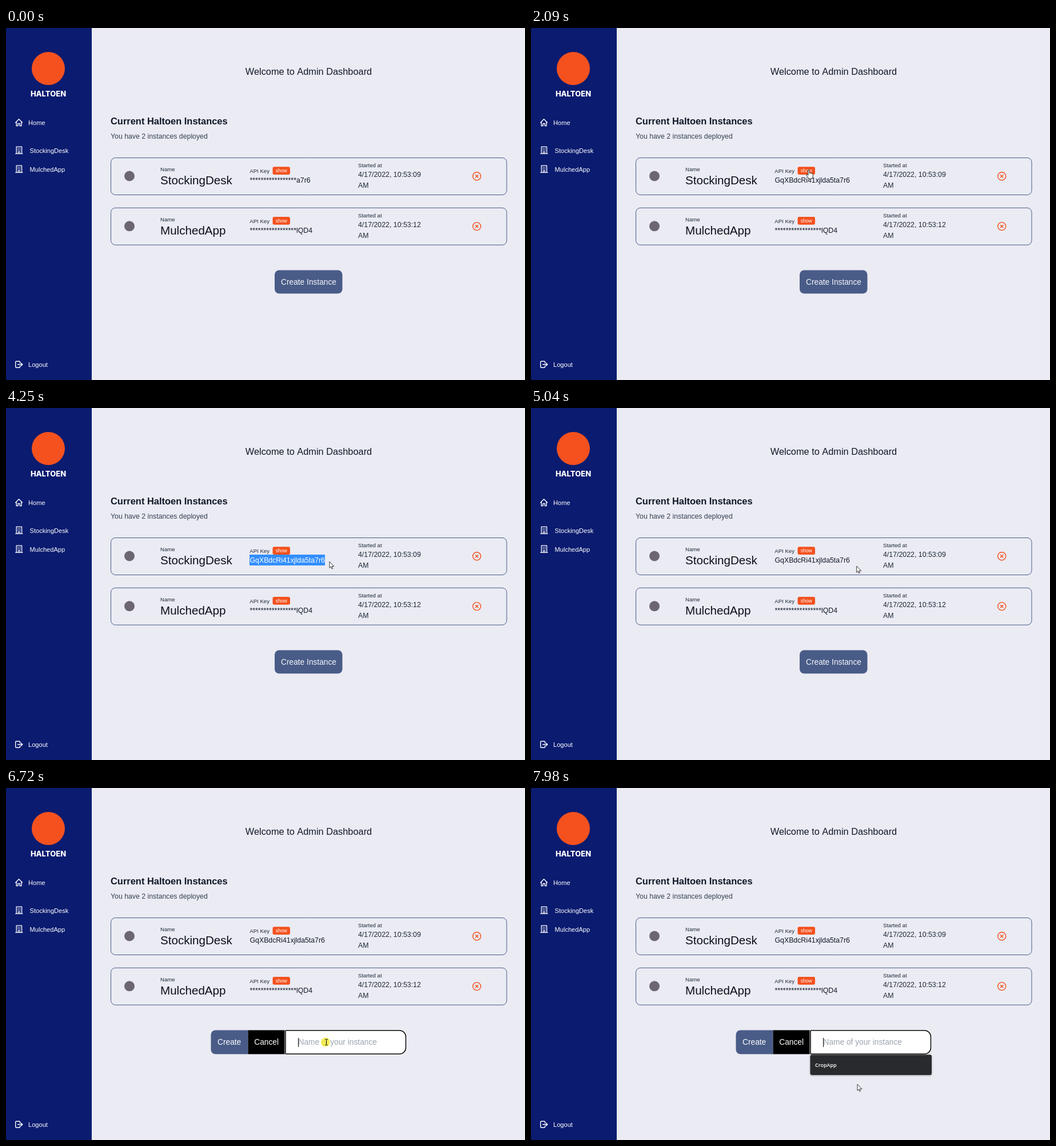
An HTML page with a canvas for the animation above (8 s loop, 908 by 617 pixels).

```html
<!DOCTYPE html>
<html lang="en">
<head>
<meta charset="utf-8">
<title>Admin Dashboard</title>
<style>
html, body { margin: 0; width: 100%; height: 100%; overflow: hidden; background: #eaebf3; }
canvas { display: block; }
</style>
</head>
<body>
<canvas id="stage" width="908" height="617"></canvas>
<script>
const ctx = document.getElementById('stage').getContext('2d');
const LOOP = 8000;
const SANS = '"Liberation Sans", Arial, sans-serif';
const NAVY = '#0a1b70', SLATE = '#495c88', ORANGE = '#f4511e', INK = '#111827', PAGE = '#eaebf3';
const KEY = 'GqXBdcRi41xjlda5ta7r6';
const MASK = '*'.repeat(17);

// Pointer keys: time, x, y, shape used from that time on
const PATH = [
  [760, 872, 600, 'arrow'], [860, 835, 535, 'arrow'], [940, 790, 465, 'arrow'],
  [1020, 740, 400, 'arrow'], [1120, 600, 300, 'arrow'], [1210, 524, 253, 'arrow'],
  [1380, 508, 249, 'arrow'], [1610, 508, 249, 'arrow'], [1700, 494, 249, 'hand'],
  [1800, 486, 249, 'hand'], [2180, 486, 249, 'hand'], [2270, 498, 251, 'arrow'],
  [2400, 529, 257, 'arrow'], [2520, 526, 264, 'beam'], [2720, 521, 272, 'beam'],
  [2940, 518.5, 269, 'beam'], [3950, 518.5, 269, 'beam'], [4150, 559, 270, 'arrow'],
  [4250, 565.5, 269.5, 'arrow'], [4640, 565.5, 269.5, 'arrow'], [4870, 569, 277, 'arrow'],
  [5040, 569, 277, 'arrow'], [5160, 590, 310, 'arrow'], [5300, 630, 385, 'arrow'],
  [5400, 610, 432, 'arrow'], [5450, 588, 447, 'hand'], [5480, 579.5, 451, 'hand'],
  [5610, 561, 455, 'hand'], [5880, 561, 455, 'beam'], [6280, 561, 455, 'beam'],
  [6420, 560.5, 445.5, 'beam'], [6860, 560.5, 445.5, 'beam'], [6910, 564, 468, 'arrow'],
  [7070, 578, 542, 'arrow'], [7240, 578, 542, 'arrow'], [7280, 579, 540, 'arrow'],
  [7810, 579, 540, 'arrow'], [7980, 570.5, 519.5, 'arrow']
];
const CLICKS = [[1940, 2080], [3080, 3150], [3200, 3350], [4450, 4590], [5780, 5880], [6720, 6860]];
const within = (t, a, b) => t >= a && t < b;

function text(str, x, y, size, color, { weight = 400, align = 'left', family = SANS } = {}) {
  ctx.font = `${weight} ${size}px ${family}`;
  ctx.textAlign = align;
  ctx.fillStyle = color;
  ctx.fillText(str, x, y);
}

function rect(x, y, w, h, radius, fill, stroke, width = 1) {
  ctx.beginPath();
  ctx.roundRect(x, y, w, h, radius);
  if (fill) { ctx.fillStyle = fill; ctx.fill(); }
  if (stroke) { ctx.strokeStyle = stroke; ctx.lineWidth = width; ctx.stroke(); }
}

function disc(x, y, r, fill) {
  ctx.beginPath();
  ctx.arc(x, y, r, 0, Math.PI * 2);
  ctx.fillStyle = fill;
  ctx.fill();
}

function shape(x, y, d, stroke, width, fill) {
  const path = new Path2D(d);
  ctx.save();
  ctx.translate(x, y);
  ctx.lineJoin = ctx.lineCap = 'round';
  if (fill) { ctx.fillStyle = fill; ctx.fill(path); }
  ctx.strokeStyle = stroke;
  ctx.lineWidth = width;
  ctx.stroke(path);
  ctx.restore();
}

function building(y) {
  shape(16, y, 'M.7 12.8H13 M2.2 12.8V.7H11.6V12.8 M5.4 12.8V9.6H8.4V12.8', '#fff', 1.3);
  shape(16, y, 'M4.8 3.2H5.8 M8 3.2H9 M4.8 5.2H5.8 M8 5.2H9 M4.8 7.2H5.8 M8 7.2H9', '#fff', 1.1);
}

function sidebar() {
  rect(0, 0, 150, 617, 0, NAVY);
  disc(74, 71, 29, ORANGE);
  text('HALTOEN', 74, 119.5, 13, '#fff', { weight: 800, align: 'center', family: 'Inter, sans-serif' });
  shape(16, 159, 'M.7 6.8 6.6 .8 12.5 6.8 M2.2 5.5V12.5H5V8.5H8.2V12.5H11V5.5', '#fff', 1.4);
  text('Home', 39, 170, 11.1, '#fff');
  building(207.5);
  text('StockingDesk', 41.5, 219.3, 11.1, '#fff');
  building(240.5);
  text('MulchedApp', 41.5, 252.2, 11.1, '#fff');
  shape(16, 583.5, 'M8.5 3.7V2Q8.5 .7 7.2 .7H2Q.7 .7 .7 2V10.4Q.7 11.7 2 11.7H7.2Q8.5 11.7 8.5 10.4V8.7 M4.5 6.2H12.7 M10.3 3.7 12.8 6.2 10.3 8.7', '#fff', 1.4);
  text('Logout', 39, 594.3, 11.1, '#fff');
}

function card(y, name, key, time, selected) {
  rect(183.5, y + .5, 692.5, 65, 8, null, SLATE);
  disc(216, y + 32.5, 9, '#6c6670');
  text('Name', 270, y + 24, 9.6, '#1f2937');
  text(name, 270, y + 46.7, 20.6, '#0b0f19');
  text('API Key', 426.3, y + 27, 9.6, '#1f2937');
  rect(466.5, y + 16.2, 30.5, 13.8, 3, ORANGE);
  text('show', 481.7, y + 25.8, 8.6, '#fff', { align: 'center' });
  if (selected) rect(426, y + 30, 132, 19, 0, '#338fff');
  text(key, 426.5, y + 44, 12.32, selected ? '#fff' : INK);
  text('Started at', 616, y + 17, 9.6, '#1f2937');
  text('4/17/2022, ' + time, 616, y + 34.4, 12.35, '#1f2937');
  text('AM', 616, y + 53.3, 12.35, '#1f2937');
  shape(823.7, y + 32.8, 'M7 0A7 7 0 1 1 -7 0A7 7 0 1 1 7 0 M-2.2 -2.2 2.2 2.2 M2.2 -2.2 -2.2 2.2', ORANGE, 1.4);
}

function createButton(hover) {
  rect(470, 424.5, 118.5, 41, 8, hover ? NAVY : SLATE);
  text('Create Instance', 529.5, 449.7, 13.74, hover ? ORANGE : '#f5f6fa', { align: 'center' });
}

function form(t) {
  const focused = t >= 6720;
  rect(358.5, 424.5, 65, 42, [8, 0, 0, 8], SLATE);
  text('Create', 370, 450.4, 13.74, '#fff');
  rect(423.5, 424.5, 64.5, 42, 0, '#000');
  text('Cancel', 434.3, 450.4, 13.74, '#fff');
  const corners = [1, 11, 11, 1];
  if (focused) rect(489, 425, 210.5, 41.2, corners, null, '#fff', 3);
  rect(489, 425, 210.5, 41.2, corners, '#fff', focused && '#000', 1.5);
  text('Name of your instance', 511.5, 450.4, 13.74, '#9ca3af');
  if (focused && !within(t, 7240, 7810)) rect(511, 438, 1, 16, 0, '#000');
  if (t >= 6820) {
    ctx.save();
    ctx.shadowColor = 'rgba(0,0,0,.35)';
    ctx.shadowBlur = 3;
    ctx.shadowOffsetY = 1;
    rect(488.5, 467.5, 212.5, 35.5, 3, '#292a2d');
    ctx.restore();
    text('CropApp', 497, 489, 9, '#fff', { weight: 600, family: '"Open Sans", sans-serif' });
  }
}

const POINTERS = {
  arrow: (x, y) => shape(x, y, 'M.5 .3V10.8L2.9 8.6 4.6 12.4 6.2 11.7 4.6 8H7.9Z', '#222', .9, '#fff'),
  beam: (x, y) => shape(x, y, 'M-2.2 -5H-.8L0 -4.4 .8 -5H2.2 M0 -4.4V4.4 M-2.2 5H-.8L0 4.4 .8 5H2.2', '#111', 1),
  hand: (x, y) => shape(x, y, 'M-1.3 .8Q-1.3 -.3 -.2 -.3T1 .8V5.2Q2.6 4.5 3.3 5.6Q4.9 5 5.5 6.2Q7.3 6 7.3 7.8V10.5Q7.3 12.5 5.8 13.5V15.3H-.6V13.8L-4 9.4Q-4.8 8.2 -3.8 7.6Q-2.8 7.2 -1.3 9Z', '#111', .9, '#fff')
};

function pointer(t) {
  if (t < PATH[0][0]) return;
  const next = PATH.findIndex(key => key[0] > t);
  const a = PATH[next < 0 ? PATH.length - 1 : next - 1];
  const b = next < 0 ? a : PATH[next];
  const p = b === a ? 0 : (t - a[0]) / (b[0] - a[0]);
  const x = a[1] + (b[1] - a[1]) * p;
  const y = a[2] + (b[2] - a[2]) * p;
  if (CLICKS.some(([on, off]) => within(t, on, off))) disc(x - (a[3] === 'beam' ? 1.5 : 0), y, 8, 'rgba(245,236,40,.75)');
  POINTERS[a[3]](x, y);
}

function draw() {
  const t = performance.now() % LOOP;
  rect(0, 0, 908, 617, 0, PAGE);
  sidebar();
  text('Welcome to Admin Dashboard', 529.5, 81.5, 16.35, INK, { align: 'center' });
  text('Current Haltoen Instances', 183, 169.4, 16.45, INK, { weight: 700 });
  text('You have 2 instances deployed', 183, 194, 12.3, '#374151');
  card(227, 'StockingDesk', t < 2080 ? MASK + 'a7r6' : KEY, '10:53:09', within(t, 3200, 4590));
  card(314.8, 'MulchedApp', MASK + 'lQD4', '10:53:12', false);
  if (t < 5880) createButton(t >= 5450);
  else form(t);
  pointer(t);
  requestAnimationFrame(draw);
}
draw();
</script>
</body>
</html>
```
